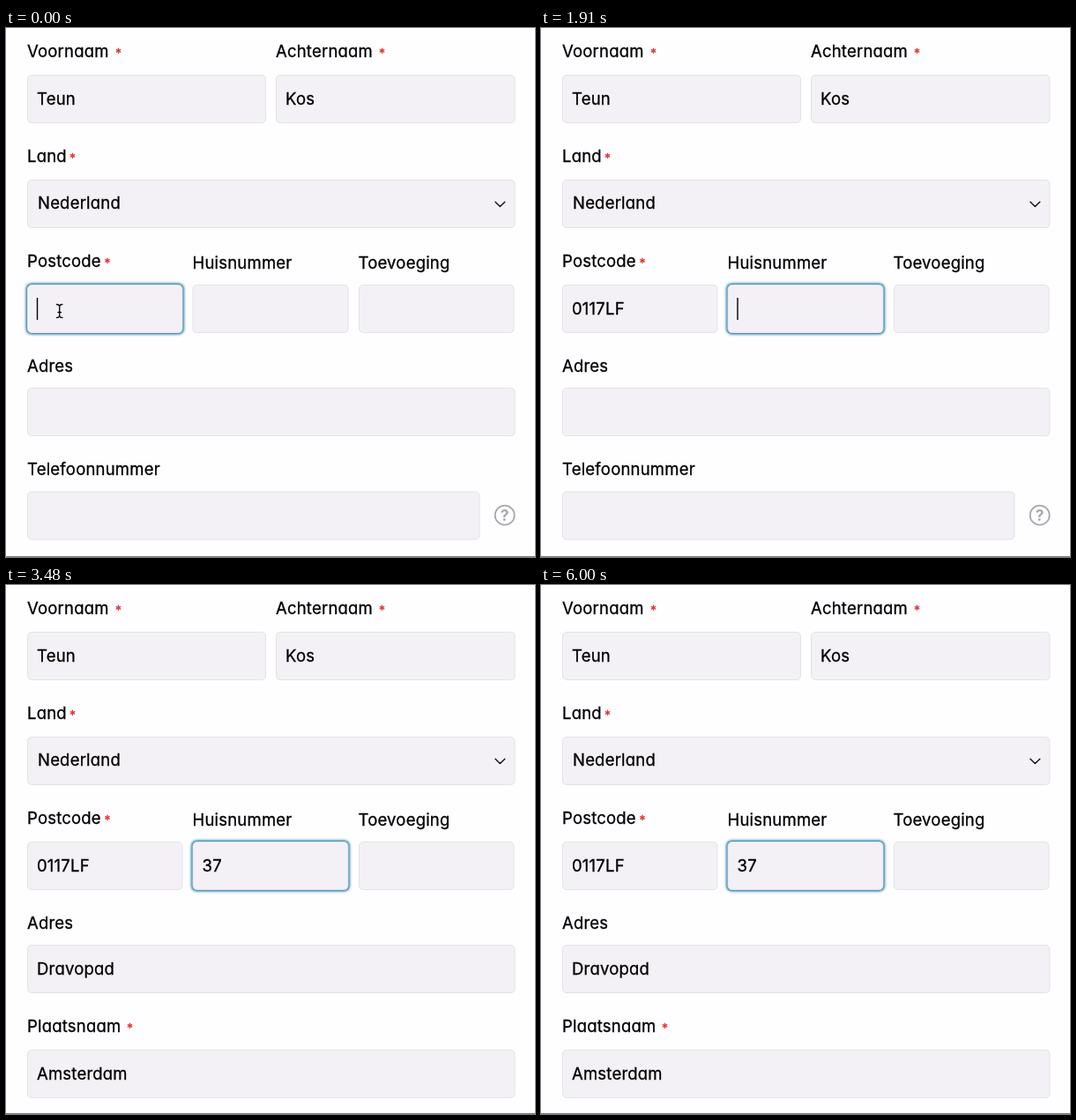
An HTML page that plays this animation: 600 by 600 pixels, repeating every 6060 ms.

```html
<!DOCTYPE html>
<html lang="nl">
<head>
<meta charset="utf-8">
<title>Adresformulier</title>
<style>
  html, body { margin: 0; width: 100%; height: 100%; overflow: hidden; background: #fefdff; }
  svg { display: block; width: 100vw; height: 100vh; }
  text { font: 18.5px Inter, Roboto, sans-serif; font-feature-settings: "cv11"; letter-spacing: .2px; fill: #000; stroke: #000; stroke-width: .3; }
  .star { font-size: 14px; fill: #e02b27; stroke: #e02b27; text-anchor: middle; letter-spacing: 0; }
  .field { fill: #f3f1f5; stroke: #e3e2e6; }
  .glow { fill: #00699d; filter: blur(1.8px); }
  .line { fill: none; stroke: #111; stroke-width: 1.4; stroke-linecap: round; stroke-linejoin: round; }
  .help { fill: none; stroke: #a9a9ac; stroke-width: 1.8; }
  .mark { font-size: 17.5px; font-weight: 700; fill: #a9a9ac; stroke: none; text-anchor: middle; letter-spacing: 0; }
</style>
</head>
<body>
<svg viewBox="0 0 600 600">
  <g id="form"></g>
  <rect y="599" width="600" height="1" fill="#77777a"/>
</svg>
<script>
const LOOP = 6060;
const form = document.getElementById('form');

function add(tag, attrs, parent = form, content = '') {
  const el = document.createElementNS('http://www.w3.org/2000/svg', tag);
  for (const key in attrs) el.setAttribute(key, attrs[key]);
  el.textContent = content;
  parent.append(el);
  return el;
}
const group = () => add('g', {});
const write = (x, y, content, parent) => add('text', { x, y }, parent, content);
const box = (x, y, width, parent) =>
  add('rect', { x, y, width, height: 54, rx: 4.5, class: 'field' }, parent);

function label(x, y, content, starX, parent) {
  write(x, y, content, parent);
  if (starX) add('text', { x: starX, y: y + 1, class: 'star' }, parent, '*');
}

// A field whose focus glow spreads out from underneath it.
function input(x, width, keys) {
  const glow = add('rect', { x: x - 1.7, y: 289.8, width: width + 3.4, height: 57.4, rx: 6, class: 'glow' });
  box(x, 291.5, width);
  return { x: x + 10.5, glow, keys, text: write(x + 10.5, 325, '') };
}

label(24, 33, 'Voornaam', 127.5);
box(24.5, 53.5, 270);
write(35, 86.5, 'Teun');

label(306, 33, 'Achternaam', 426.5);
box(306.5, 53.5, 270.5);
write(317, 86.5, 'Kos');

label(24, 152, 'Land', 75.5);
box(24.5, 172.5, 552.5);
write(36, 205, 'Nederland');
add('path', { d: 'M555 197.2l5.4 5.4 5.4-5.4', class: 'line' });

label(24, 271, 'Postcode', 115);
label(211.5, 273, 'Huisnummer');
label(399.5, 273, 'Toevoeging');
const inputs = [
  input(24.5, 175.5, [[0, ''], [240, '0'], [550, '01'], [720, '011'], [880, '0117'], [1360, '0117L'], [1580, '0117LF']]),
  input(212, 176, [[0, ''], [2180, '3'], [2520, '37']])
];
box(400.5, 291.5, 175.5);

label(24, 390, 'Adres');
box(24.5, 408.5, 552.5);

const phone = group();
label(24, 507, 'Telefoonnummer', 0, phone);
box(24.5, 526, 512.5, phone);
add('circle', { cx: 565.7, cy: 552.7, r: 11, class: 'help' }, phone);
add('text', { x: 565.7, y: 559, class: 'mark' }, phone, '?');

const found = group();
write(35, 442, 'Dravopad', found);
label(24, 507, 'Plaatsnaam', 140.5, found);
box(24.5, 527.5, 552.5, found);
write(35, 561, 'Amsterdam', found);

const caret = add('rect', { y: 306, width: 1.4, height: 25 });
const pointer = add('path', {
  d: 'M57.5 313.5q3 0 3.2 2.2q.2-2.2 3.2-2.2M60.7 315v12M57.5 328.5q3 0 3.2-2.2q.2 2.2 3.2 2.2M59 322.5h3.4',
  class: 'line'
});

const caretSteps = [[0, 1], [3000, 0], [3520, 1], [4000, 0], [4520, 1], [5000, 0], [5520, 1], [6000, 0]];
const fadeSteps = [[0, 1], [3150, .9], [3190, .8], [3230, .7], [3270, .6], [3480, 1]];

const at = (steps, t) => steps.filter(step => step[0] <= t).pop()[1];
const show = (el, on) => el.setAttribute('visibility', on ? 'visible' : 'hidden');

function draw(t) {
  const active = inputs[t < 1910 ? 0 : 1];
  for (const field of inputs) {
    field.text.textContent = at(field.keys, t);
    show(field.glow, field === active);
  }
  const typed = active.text.textContent ? active.text.getComputedTextLength() : 0;
  caret.setAttribute('x', active.x + typed - .2);
  show(caret, at(caretSteps, t));
  show(pointer, t < 270);
  show(phone, t < 3480);
  show(found, t >= 3480);
  form.setAttribute('opacity', at(fadeSteps, t));
}

const start = performance.now();
function tick() {
  draw((performance.now() - start) % LOOP);
  requestAnimationFrame(tick);
}
tick();
</script>
</body>
</html>
```
